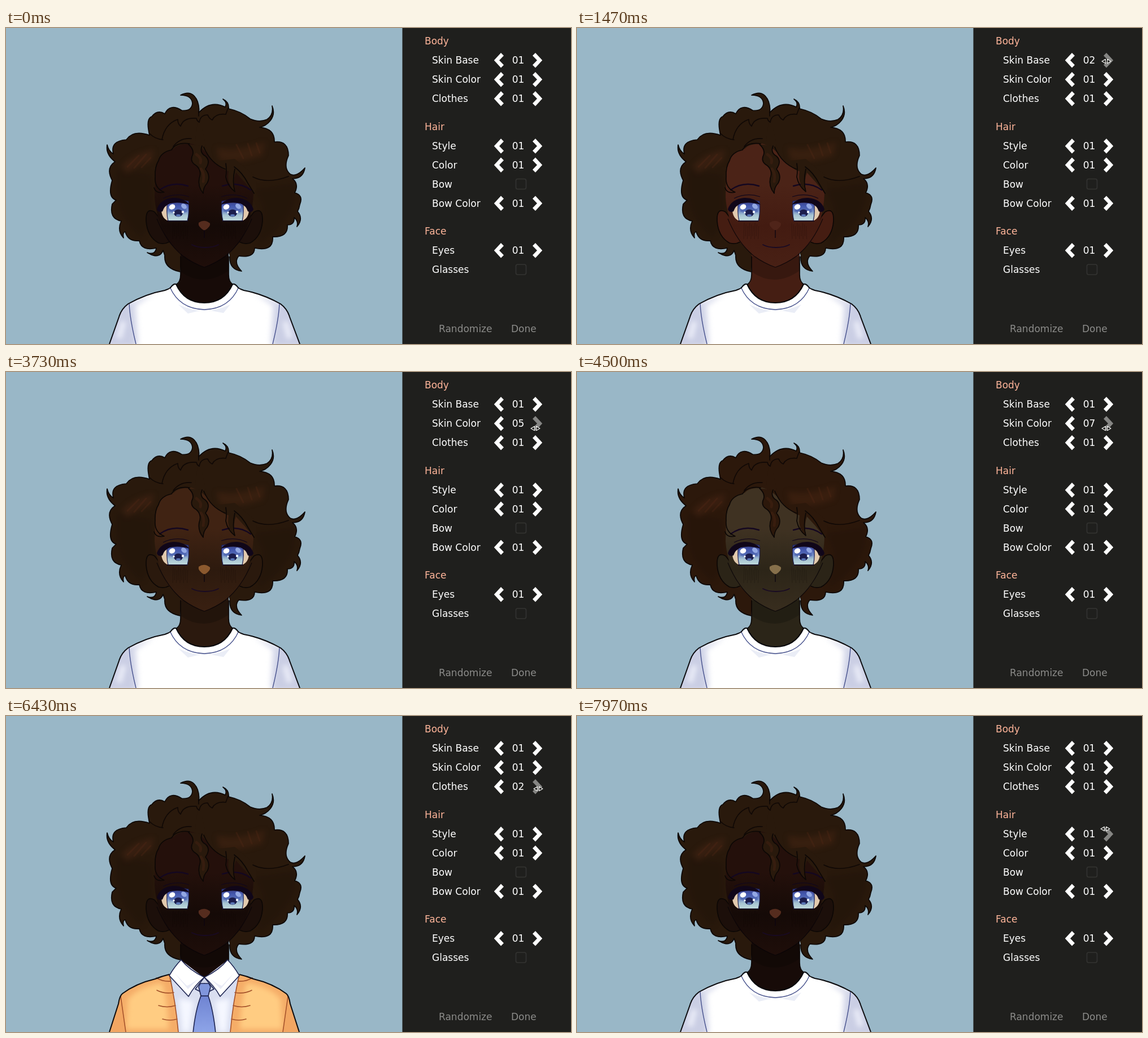
These frames come from a looping animation (1000x560 px, 8 s). An HTML page:

```html
<!DOCTYPE html>
<html lang="en">
<head>
<meta charset="utf-8">
<title>Character creator</title>
<style>
html, body { margin: 0; width: 100%; height: 100%; overflow: hidden; background: #99b7c7; }
svg { display: block; width: 100%; height: 100%; }
text { font: 17px "DejaVu Sans", sans-serif; fill: #fff; }
.head { fill: #ffb59a; }
.foot { fill: #8b8b89; }
.num { text-anchor: middle; }
.arrow { fill: #fff; }
.arrow.on { fill: #858583; }
.box { fill: none; stroke: #343432; stroke-width: 1.6; }
.ink { stroke: #0c0705; stroke-width: 1.7; stroke-linejoin: round; stroke-linecap: round; }
.none { fill: none; }
.hair { fill: var(--hair); }
.edge { stroke: #0a090c; stroke-width: 2; stroke-linejoin: round; }
.seam { fill: none; stroke: #46518c; stroke-width: 1.4; }
.navy { stroke: #1c2350; stroke-width: 1.6; stroke-linejoin: round; }
.rib { fill: none; stroke: #a4522a; stroke-width: 1.6; stroke-linecap: round; }
.soft { filter: url(#soft); }
.lash { fill: #100619; }
.brow { fill: none; stroke: #140720; stroke-width: 2.4; stroke-linecap: round; }
</style>
</head>
<body>
<svg id="stage" viewBox="0 0 1000 560" preserveAspectRatio="none">
<defs>
  <filter id="soft" x="-30%" y="-30%" width="160%" height="160%" color-interpolation-filters="sRGB"><feGaussianBlur stdDeviation="5"/></filter>
  <linearGradient id="skin" gradientUnits="userSpaceOnUse" x1="0" y1="215" x2="0" y2="425">
    <stop offset=".3" style="stop-color:var(--top)"/>
    <stop offset=".65" style="stop-color:var(--low)"/>
    <stop offset="1" style="stop-color:color-mix(in srgb, var(--top) 65%, var(--low))"/>
  </linearGradient>
  <linearGradient id="iris" x1="0" y1="0" x2="0" y2="1">
    <stop offset="0" stop-color="#262a6e"/>
    <stop offset=".3" stop-color="#5265b8"/>
    <stop offset=".52" stop-color="#6d88c4"/>
    <stop offset=".72" stop-color="#a5c3d2"/>
    <stop offset="1" stop-color="#c2dcde"/>
  </linearGradient>
  <linearGradient id="tie" x1="0" y1="0" x2="0" y2="1">
    <stop offset="0" stop-color="#6f84d2"/>
    <stop offset="1" stop-color="#8ea5e8"/>
  </linearGradient>
  <clipPath id="torso"><path d="M300 454Q292 461 281 465Q248 471 216 489Q204 498 200 512L183 560H520L502 512Q498 498 486 489Q454 471 421 465Q410 461 402 454Q388 487 351 487Q314 487 300 454Z"/></clipPath>

  <g id="sideEye">
    <path d="M275 318Q274 335 285 341H288V308H282Z" fill="#e2caae"/>
    <path d="M286 307Q283 326 287 342H321Q325 326 323 307Q304 302 286 307Z" fill="url(#iris)" stroke="#1d2050" stroke-width="1.2"/>
    <path class="lash" d="M267 321Q273 303 296 301Q314 300 325 313Q305 307 290 311Q280 315 277 325Q269 328 267 321Z"/>
    <path d="M278 302Q300 291 324 299" fill="none" stroke="#12071a" stroke-width="1.2"/>
    <path d="M285 342H321" stroke="#12071a" stroke-width="1.4"/>
    <path class="brow" d="M272 287Q294 271 322 280"/>
  </g>
  <g id="shine">
    <path d="M289 325Q291 313 304 312Q318 313 320 326Q304 332 289 325Z" fill="#3346a0" opacity=".4"/>
    <ellipse cx="305" cy="328" rx="8" ry="6.5" fill="#1b1d4c"/>
    <ellipse cx="305" cy="332" rx="4" ry="2" fill="#5b78b8"/>
    <ellipse cx="294" cy="317" rx="5.5" ry="4.5" fill="#fff" transform="rotate(-25 294 317)"/>
    <ellipse cx="315" cy="316" rx="5.5" ry="4" fill="#93a8e4" transform="rotate(40 315 316)"/>
    <circle cx="313" cy="326" r="2.2" fill="#f0f6ff"/>
    <circle cx="297" cy="327" r="1.7" fill="#f0f6ff"/>
  </g>
  <g id="collarHalf">
    <path class="navy" d="M310 432Q299 443 289 460L323 497Q334 477 351 463Q324 450 310 432Z" fill="#fff"/>
    <path d="M298 455L322 484L340 466Q325 477 320 478Z" fill="#d7dbee" opacity=".55"/>
  </g>
  <g id="jacketHalf">
    <path d="M289 458Q276 461 264 466Q230 474 206 492Q201 496 199 510L183 560H305Q300 505 289 458Z" fill="#f5ad68"/>
    <path class="soft" d="M270 474Q232 482 216 502L213 555H288Q287 510 277 474Z" fill="#ffcc82"/>
    <path d="M203 497L212 560H183Z" fill="#f2a662"/>
    <path class="rib" d="M289 458Q300 505 305 560M203 497L212 560M266 464Q277 471 292 470M267 486Q280 493 297 490M270 513Q285 518 300 513M277 537Q290 541 303 537"/>
    <path class="edge none" d="M289 458Q276 461 264 466Q230 474 206 492Q201 496 199 510L183 560"/>
  </g>
</defs>

<rect width="1000" height="560" fill="#99b7c7"/>

<!-- hair behind the head -->
<g class="hair">
  <ellipse cx="345" cy="275" rx="115" ry="127"/>
  <path class="ink" d="M341 150Q362 127 388 140Q392 132 384 126Q395 131 394 143Q417 148 432 161Q448 168 462 162Q474 154 471 138Q477 152 468 164Q460 174 449 176Q476 178 475 202Q500 199 500 226Q490 248 503 259Q514 265 529 248Q526 267 507 267Q519 276 511 292Q527 296 520 313Q519 320 516 325Q527 338 515 352Q518 342 510 336Q511 349 498 349Q500 371 472 370Q474 397 440 390Q440 408 412 404Q402 416 417 431Q395 428 396 405"/>
  <path class="ink" d="M308 432Q279 426 281 403L278 394Q272 411 250 398Q264 403 266 390Q240 396 236 377Q216 379 211 361Q206 362 208 372Q196 359 204 342Q182 338 188 312L195 305Q179 300 188 270Q176 248 193 237Q176 224 179 207Q182 219 190 223Q184 200 213 198Q225 180 254 190Q247 160 258 157Q268 144 281 152Q290 133 311 146Q328 148 330 134Q329 119 309 119Q330 108 339 130Q343 142 341 150"/>
</g>
<g class="soft">
  <path d="M196 250Q185 330 240 372L262 340L258 260Z" fill="#170e06" opacity=".2"/>
  <path d="M508 275Q525 330 445 385L455 320L440 285Z" fill="#170e06" opacity=".2"/>
  <path d="M205 245Q225 222 262 216L258 236Q235 240 214 258Z" fill="#4f2917" opacity=".4"/>
  <path d="M372 212Q410 220 458 202L454 226Q410 242 378 234Z" fill="#4f2815" opacity=".4"/>
</g>

<!-- neck, ears, face -->
<path d="M309 395V437Q309 452 301 456Q316 487 351 488Q386 487 402 456Q394 451 394 437V395Z" style="fill:var(--neck)"/>
<path d="M309 405H394V430Q350 461 309 432Z" fill="#000" opacity=".2"/>
<path class="ink none" d="M309 405V437Q309 450 301 455M394 405V437Q394 450 402 455"/>
<g id="ears">
  <path id="ear" class="ink" d="M263 326Q247 317 248 342Q250 370 270 381Q280 384 289 379L270 335Z" style="fill:var(--ear)"/>
  <use href="#ear" transform="matrix(-1 0 0 1 702 0)"/>
</g>
<path d="M263 300Q265 335 285 375Q311 408 351 424Q391 408 417 375Q437 335 438 292Q422 272 405 254L388 250Q372 244 360 228Q347 210 328 205Q304 205 297 214Q274 220 270 235Q263 248 264 264Z" fill="url(#skin)"/>
<path d="M267 338Q284 380 313 404Q331 417 351 424Q371 417 389 404Q418 380 435 338" fill="none" stroke="#090408" stroke-width="1.3" opacity=".8"/>
<path id="blush" fill="none" stroke="#080304" stroke-width=".8" opacity=".25"/>
<path d="M341 345Q351 338 361 346Q363 352 351 359Q339 352 341 345Z" style="fill:var(--nose)"/>
<path d="M351 358V372" stroke="#0c0510" stroke-width="1.3"/>
<path d="M329 384Q338 389 352 389Q367 389 376 384" fill="none" stroke="#180a24" stroke-width="1.8" stroke-linecap="round"/>
<use href="#sideEye"/>
<use href="#sideEye" transform="matrix(-1 0 0 1 705 0)"/>
<use href="#shine"/>
<use href="#shine" x="96"/>

<!-- fringe -->
<g class="hair ink">
  <path d="M323 206Q335 217 329 228Q326 238 337 244Q347 253 342 266Q339 281 349 293Q349 282 356 275Q363 262 353 250Q363 236 353 227Q342 221 347 209"/>
  <path d="M372 236Q382 252 394 254Q390 276 405 290Q401 272 407 256Q418 259 428 275L439 293Q448 283 440 262L405 232Z" stroke="none"/>
  <path class="none" d="M350 211Q362 240 388 250M389 240Q391 253 389 264Q392 280 405 290Q400 272 405 250M404 246Q419 257 428 275L439 293"/>
  <path class="none" d="M264 263Q262 284 280 291Q265 294 262 283M264 264Q263 246 270 235Q274 220 293 216Q301 202 325 205"/>
</g>
<path class="ink none" d="M276 198Q281 170 304 162Q304 170 309 174Q314 158 337 160Q338 165 342 167Q344 154 357 154Q359 160 365 163Q371 151 389 153L393 142M254 187Q264 197 278 198M296 210Q308 194 328 196M437 264Q463 277 500 263M341 148V156" opacity=".85"/>
<path d="M337 224Q347 231 344 239M345 250Q352 258 349 272" fill="none" stroke="#4d2716" stroke-width="5" opacity=".35" stroke-linecap="round"/>
<path d="M215 246L235 226M227 248L248 224M240 247L256 230M408 207L420 231M428 205L435 226M443 204L449 221" stroke="#5b2e1a" stroke-width="3" opacity=".25" stroke-linecap="round"/>

<!-- outfits -->
<g class="outfit">
  <g clip-path="url(#torso)">
    <rect x="180" y="450" width="345" height="112" fill="#fff"/>
    <g class="soft">
      <path d="M206 480L220 490L230 565H170ZM496 480L482 490L472 565H532Z" fill="#cacee4"/>
      <path d="M216 487L262 470L230 492L234 560H226ZM486 487L440 470L472 492L468 560H476Z" fill="#cdd1e7" opacity=".8"/>
      <path d="M208 520L200 550M494 520L502 550" stroke="#eef0fa" stroke-width="9"/>
    </g>
    <path d="M305 490Q351 512 397 490L385 505L351 499L322 506Z" fill="#e2e5f3" opacity=".7"/>
  </g>
  <path class="seam" d="M290 459Q307 498 351 499Q395 498 412 459M218 488Q219 515 230 560M484 488Q483 515 472 560"/>
  <path class="edge none" d="M183 560L200 512Q204 498 216 489Q248 471 281 465Q292 461 292 459Q296 453 301 454Q316 487 351 487Q386 487 401 454Q406 453 410 459Q410 461 421 465Q454 471 486 489Q498 498 502 512L520 560"/>
</g>
<g class="outfit">
  <path d="M292 458L309 432L351 464L393 432L411 458L399 560H303Z" fill="#d9def0"/>
  <path class="soft" d="M306 500L332 505L325 560H312ZM396 500L370 505L377 560H390Z" fill="#f5f7ff"/>
  <use href="#jacketHalf"/>
  <use href="#jacketHalf" transform="matrix(-1 0 0 1 702 0)"/>
  <g class="formal"></g>
</g>
<g class="outfit">
  <path class="edge" d="M183 560L200 512Q204 498 216 489Q248 471 289 460L309 432L351 464L393 432L413 460Q454 471 486 489Q498 498 502 512L520 560" fill="#fff"/>
  <path class="soft" d="M206 495L220 498L230 560H195ZM496 495L482 498L472 560H507Z" fill="#cacee4"/>
  <path class="seam" d="M218 488Q219 515 230 560M484 488Q483 515 472 560"/>
  <g class="formal"></g>
</g>
<g id="formal">
  <path class="navy" d="M345 496L358 496Q367 522 371 562H331Q335 522 345 496Z" fill="url(#tie)"/>
  <path class="navy" d="M351 463L335 484L343 488L351 474L360 488L368 484Z" fill="#cfd5ea"/>
  <path class="navy" d="M344 474H359L362 480L358 496H345L341 480Z" fill="#8096dc"/>
  <use href="#collarHalf"/>
  <use href="#collarHalf" transform="matrix(-1 0 0 1 702 0)"/>
</g>

<rect x="701.5" width="298.5" height="560" fill="#1f1f1d"/>
<g id="panel"></g>
<text class="foot" x="766" y="539">Randomize</text>
<text class="foot" x="894" y="539">Done</text>
<g id="cursor" fill="#252523" stroke="#f4f4f2" stroke-width="1.1" stroke-linejoin="round">
  <path d="M-8 0L-1.6 -3.7V3.7ZM8 0L1.6 -3.7V3.7Z"/>
</g>
</svg>
<script>
const $ = id => document.getElementById(id);
const stage = $('stage'), panel = $('panel'), cursor = $('cursor');
const outfits = [...document.querySelectorAll('.outfit')];
const LOOP = 8000;

function add(tag, attrs, text) {
  const el = document.createElementNS('http://www.w3.org/2000/svg', tag);
  for (const k in attrs) el.setAttribute(k, attrs[k]);
  if (text) el.textContent = text;
  return panel.appendChild(el);
}

for (const [label, y] of [['Body', 29], ['Hair', 181], ['Face', 366]])
  add('text', { class: 'head', x: 741, y }, label);

const rows = [['Skin Base', 57], ['Skin Color', 91], ['Clothes', 125], ['Style', 209],
  ['Color', 242.5], ['Bow Color', 310.5], ['Eyes', 394]].map(([label, y]) => {
  add('text', { x: 754, y: y + 6 }, label);
  const arrow = side => add('path', {
    class: 'arrow', d: 'M30.5 -13L25.5 -8L33.5 .2L25.5 8.5L30.5 13.5L42.7 .2Z',
    transform: `translate(906.5 ${y}) scale(${side} 1)`
  });
  arrow(-1);
  return { y, next: arrow(1), num: add('text', { class: 'num', x: 906.5, y: y + 6 }, '01') };
});
for (const [label, y] of [['Bow', 276.5], ['Glasses', 428]]) {
  add('text', { x: 754, y: y + 6 }, label);
  add('rect', { class: 'box', x: 902.5, y: y - 9, width: 18, height: 18, rx: 3 });
}

let hatch = '';
for (let i = 0; i < 9; i++) {
  const top = 345 + i % 3 * 3, bottom = 374 - i % 2 * 5;
  hatch += `M${296 + i * 3.2} ${top}l-1 ${bottom - top}M${380 + i * 3.2} ${top}l1 ${bottom - top}`;
}
$('blush').setAttribute('d', hatch);

// collar and tie are shared by two outfits
const formal = $('formal');
for (const slot of document.querySelectorAll('.formal')) slot.append(formal.cloneNode(true));
formal.remove();

// top, low, ear, neck, nose
const tones = [
  '#24100b #150a07 #1c0f0a #170b08 #552c1e',
  '#321910 #1f1009 #23120b #1f100a #66391f',
  '#391e11 #27170c #27160c #24140b #784a27',
  '#412417 #2e1a0f #2a190d #2a190e #875430',
  '#402313 #2d1a0e #2a190d #2b190e #8b592e',
  '#422c1b #2e2114 #2c1f13 #2c2014 #89643c',
  '#3f3222 #2c2518 #2b2417 #2b2518 #86704b',
  '#3c392c #2a281c #2b291c #2c2a1d #857b5b'
].map(s => s.split(' '));
const bases = [null,
  '#4b2317 #431b11 #451d12 #451e13 #4f2419'.split(' '),
  '#5a2c1e #4e2217 #522619 #502418 #613123'.split(' ')];

// time, row, value
const picks = [[1470, 0, 2], [1970, 0, 3], [2500, 0, 1], [3000, 1, 2], [3230, 1, 3], [3470, 1, 4],
  [3730, 1, 5], [4100, 1, 6], [4500, 1, 7], [4930, 1, 8], [5700, 1, 1], [6430, 2, 2], [6700, 2, 3], [6970, 2, 1]];

// time, x, y
const path = [[70, 125, 5], [170, 330, 22], [300, 620, 48], [430, 830, 66], [530, 920, 75], [670, 937, 69],
  [840, 937, 69], [900, 937, 59], [2600, 937, 59], [2730, 937, 100], [5240, 937, 100], [5340, 938, 102],
  [5500, 944, 84], [5700, 944, 84], [6030, 942, 129], [7500, 942, 129], [7770, 936, 198],
  [7900, 936, 198], [7970, 935, 200]];

function place(t) {
  const i = path.findIndex(p => p[0] > t);
  if (i < 0) return path[path.length - 1].slice(1);
  if (i === 0) return path[0].slice(1);
  const [t0, x0, y0] = path[i - 1], [t1, x1, y1] = path[i];
  const k = (t - t0) / (t1 - t0);
  return [x0 + (x1 - x0) * k, y0 + (y1 - y0) * k];
}

function draw(t) {
  const values = rows.map(() => 1);
  for (const [at, row, v] of picks) if (t >= at) values[row] = v;
  const [x, y] = place(t);
  rows.forEach((r, i) => {
    r.num.textContent = '0' + values[i];
    r.next.classList.toggle('on', x > 930 && Math.abs(y - r.y) < 11.5);
  });
  cursor.setAttribute('transform', `translate(${x} ${y})`);
  cursor.style.display = t >= 70 ? '' : 'none';

  const [base, color, clothes] = values;
  const skin = base > 1 ? bases[base - 1] : tones[color - 1];
  ['top', 'low', 'ear', 'neck', 'nose'].forEach((n, i) => stage.style.setProperty('--' + n, skin[i]));
  stage.style.setProperty('--hair', color > 6 ? '#2c180b' : '#29190c');
  outfits.forEach((o, i) => o.style.display = i === clothes - 1 ? '' : 'none');
}

const start = performance.now();
function tick() {
  draw((performance.now() - start) % LOOP);
  requestAnimationFrame(tick);
}
tick();
</script>
</body>
</html>
```
